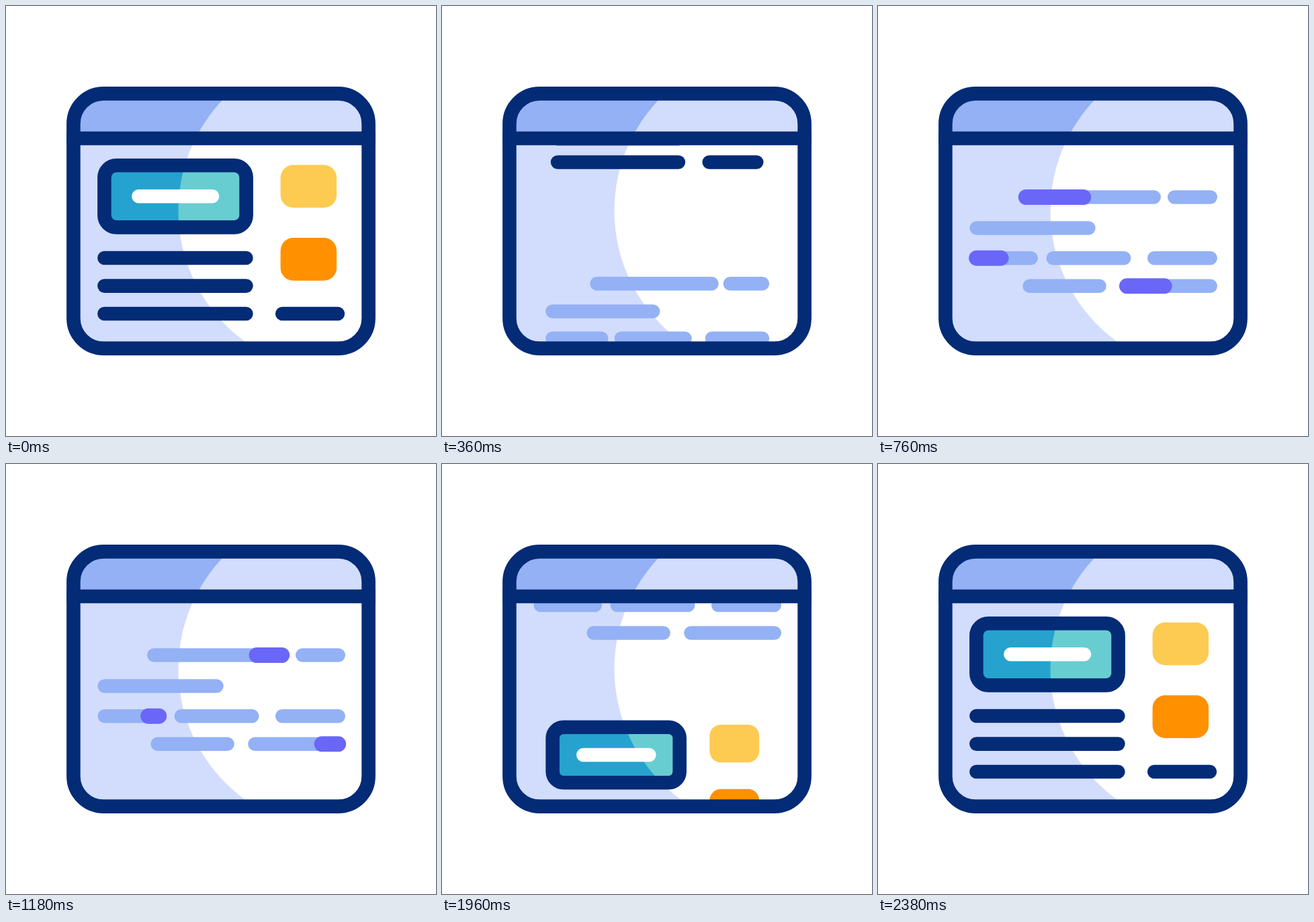
These frames come from a looping animation (640 px wide and 640 px high, 2400 ms). An HTML page with a canvas:

```html
<!DOCTYPE html>
<html lang="en">
<head>
<meta charset="utf-8">
<title>Page and code</title>
<style>
  html, body { margin: 0; width: 100%; height: 100%; overflow: hidden; background: #fff; }
  canvas { display: block; width: 640px; height: 640px; }
</style>
</head>
<body>
<canvas id="stage" width="640" height="640"></canvas>
<script>
const ctx = document.getElementById('stage').getContext('2d');
const LOOP = 2400, MID = 320, LINE = 20.6;
const NAVY = '#032b76', PALE = '#d2dcfd', BLUE = '#93b1f4', VIOLET = '#6a67f8';

// [x1, x2, y] of each bar's centre line
const pageBars = [[146.4, 357.4, 375], [146.4, 357.4, 416.6], [146.4, 357.4, 458], [411.2, 493.9, 458]];
const codeBars = [
  [220.3, 410.7, 284.5], [441.3, 494.7, 284.5],
  [146.7, 313.4, 330.5],
  [146.7, 227.7, 375.2], [260.8, 366.2, 375.2], [411.2, 494.7, 375.2],
  [225.7, 329.5, 416.8], [370.5, 494.7, 416.8]
];
const marked = [0, 3, 7];

const ease = (t, from, to) => {
  const u = Math.min(1, Math.max(0, (t - from) / (to - from)));
  return u * u * (3 - 2 * u);
};
const mix = (a, b, p) => a + (b - a) * p;

// Scaling moves the geometry about the stage centre; line widths stay constant.
const pose = (scale, dy) => ({
  s: scale,
  x: v => MID + (v - MID) * scale,
  y: v => MID + (v - MID) * scale + dy
});
const REST = pose(1, 0);

function bar([x1, x2, y], color, at = REST, width = LINE) {
  ctx.beginPath();
  ctx.moveTo(at.x(x1), at.y(y));
  ctx.lineTo(at.x(x2), at.y(y));
  ctx.lineCap = 'round';
  ctx.lineWidth = width;
  ctx.strokeStyle = color;
  ctx.stroke();
}

function box(x, y, w, h, r, at = REST) {
  ctx.beginPath();
  ctx.roundRect(at.x(x), at.y(y), w * at.s, h * at.s, r * at.s);
}

function fill(color) {
  ctx.fillStyle = color;
  ctx.fill();
}

function outline() {
  ctx.lineWidth = LINE;
  ctx.strokeStyle = NAVY;
  ctx.stroke();
}

function glow(color) {
  ctx.beginPath();
  ctx.arc(497, 305, 240.5, 0, Math.PI * 2);
  fill(color);
}

const frame = () => box(100.4, 130.4, 439.2, 379.2, 44.8);

function band(y, h, left, right) {
  ctx.save();
  ctx.beginPath();
  ctx.rect(90, y, 460, h);
  ctx.clip();
  ctx.fillStyle = left;
  ctx.fillRect(90, y, 460, h);
  glow(right);
  ctx.restore();
}

function banner(at) {
  const path = () => box(146.4, 237.2, 211.2, 92.2, 18, at);
  ctx.save();
  path();
  ctx.clip();
  fill('#26a2ce');
  glow('#68cdd1');
  ctx.restore();
  path();
  outline();
  bar([197.4, 307, 283.3], '#fff', at);
}

function page(at, tilesAt) {
  banner(at);
  pageBars.forEach(b => bar(b, NAVY, at));
  box(408.6, 236.6, 83.5, 63.7, 19, tilesAt);
  fill('#fdcb52');
  box(408.6, 345, 83.5, 63.7, 19, tilesAt);
  fill('#ff9000');
}

function content(t) {
  if (t < 1500) {
    const p = ease(t, 30, 620);
    const out = pose(mix(1, 0.75, p), -347 * p);
    const code = pose(mix(0.75, 1, p), 306 * (1 - p));
    if (p < 1) page(out, out);
    codeBars.forEach(b => bar(b, BLUE, code));
    if (t > 513 && t < 1320) {
      const head = ease(t, 513, 1046), tail = ease(t, 800, 1333);
      for (const i of marked) {
        const [x1, x2, y] = codeBars[i];
        bar([mix(x1, x2, tail), mix(x1, x2, head), y], VIOLET, REST, 23);
      }
    }
  } else {
    const p = ease(t, 1500, 2333), q = ease(t, 1500, 2380);
    const code = pose(1, -285 * p);
    codeBars.forEach(b => bar(b, BLUE, code));
    page(pose(mix(0.75, 1, p), 347 * (1 - p)), pose(mix(0.75, 1, q), mix(306, -0.8, q)));
  }
}

function draw(t) {
  ctx.fillStyle = '#fff';
  ctx.fillRect(0, 0, 640, 640);

  ctx.save();
  frame();
  ctx.clip();
  band(120, 77, BLUE, PALE);
  band(197, 323, PALE, '#fff');
  ctx.beginPath();
  ctx.rect(90, 197, 460, 323);
  ctx.clip();
  content(t);
  ctx.restore();

  frame();
  outline();
  ctx.beginPath();
  ctx.lineCap = 'butt';
  ctx.moveTo(90.2, 197);
  ctx.lineTo(549.8, 197);
  outline();
}

const start = performance.now();
function tick() {
  draw((performance.now() - start) % LOOP);
  requestAnimationFrame(tick);
}
tick();
</script>
</body>
</html>
```
